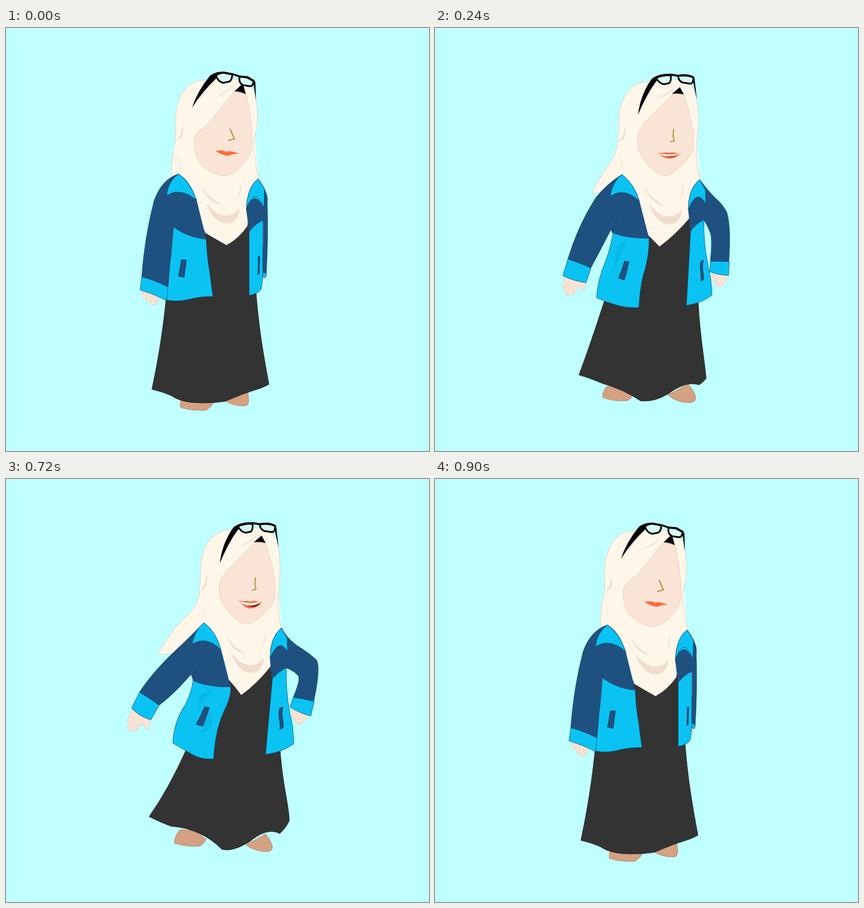
Recreate the animation shown at these times as an HTML page. Size 748x748 px, loop 0.96 s.

```html
<!DOCTYPE html>
<html lang="en">
<head>
<meta charset="utf-8">
<title>Twirl</title>
<style>
html, body { margin: 0; width: 100%; height: 100%; overflow: hidden; background: #c0ffff; }
svg { display: block; width: 100%; height: 100%; }
</style>
</head>
<body>
<svg id="stage" viewBox="0 0 748 748"></svg>
<script>
const CREAM = '#fff6ea', SKIN = '#f9e4d6', SHADE = '#f0ddd0', NAVY = '#1e5180', CYAN = '#0bc3f3',
  DRESS = '#333', SHOE = '#d4a182', LIP = '#ff6b3d', GOLD = '#b8923f';
const SOFT = '#dcc3ae', SEAM = '#123f63', LENS = '#d5fbf8';

const path = (d, fill, stroke = 'none', width = .7) =>
  `<path d="${d}" fill="${fill}" stroke="${stroke}" stroke-width="${width}" stroke-linejoin="round"/>`;

const lerpPath = (a, b, k) => {
  const to = b.match(/[\d.]+/g);
  let i = 0;
  return a.replace(/[\d.]+/g, n => +n + (to[i++] - n) * k);
};

// Each part has a shape for four poses: rest, front, lean, swing.
const behind = [], clothes = [], mouth = [];
const part = (layer, fill, stroke, rest, front, lean, swing) =>
  layer.push({ fill, stroke, shapes: [rest, front, lerpPath(front, lean, .5), lean, swing] });

// shoes
part(behind, SHOE, '#a5734f',
  'M311 656Q306 664 309 671Q325 677 354 676Q363 670 368 661L340 655Z',
  'M300 647Q292 658 296 663Q315 671 335 669Q344 668 344 664L330 652Z',
  'M308 620Q297 632 298 644Q318 651 343 649Q350 645 354 637L335 622Z',
  'M268 596Q249 612 247 627Q265 636 294 632Q300 628 302 623L290 600Z');
part(behind, SHOE, '#a5734f',
  'M386 659Q405 670 425 668Q430 664 429 655Q429 649 426 642Z',
  'M400 650Q412 666 440 666Q455 664 450 652Q445 640 436 632Z',
  'M424 647Q440 659 462 659Q472 658 471 649Q468 638 459 628Z',
  'M402 648Q420 661 440 661Q451 660 450 651Q448 640 440 630Z');
// dress
part(behind, DRESS, '#111',
  'M283 480Q275 560 258 639Q276 643 292 650Q310 663 345 663Q372 663 388 660Q420 646 450 637Q458 634 465 630C454 570 447 530 442 465L430 345L352 355Z',
  'M281 485Q262 570 256 630Q273 630 300 643Q322 660 345 664Q375 664 395 652Q425 632 450 635Q454 636 458 635C452 590 447 540 446 488L433 338L359 370Z',
  'M318 480Q288 547 253 597Q275 608 292 614Q345 618 382 655Q400 660 430 642Q462 615 484 627Q496 616 501 604C500 575 490 545 485 483L470 328L395 352Z',
  'M285 477Q240 515 202 564Q235 582 258 586Q290 620 360 656Q385 659 430 637Q450 624 462 628Q474 618 479 605C480 570 464 530 463 474L448 331L373 352Z');
// scarf end and bust
part(behind, CREAM, SOFT,
  'M299 205Q296 213 294 235Q292 250 292 265L298 262L305 258',
  'M304 207Q301 220 295 240Q290 255 288 275L295 272L311 264',
  'M342 198Q342 217 325 237Q297 260 268 310L311 309L350 254',
  'M321 204Q321 222 308 236Q275 288 199 311Q235 312 258 309L329 256');
part(behind, CREAM, 'none',
  'M299 205L305 258L335 300L352 362Q372 374 390 384Q412 372 427 350L430 300L446 268L440 190Z',
  'M304 207L311 264L342 308L358 376Q368 384 378 391Q408 368 431 342L429 310L449 273L444 205Z',
  'M342 198L350 255L380 299L394 355Q406 368 416 382Q446 360 469 330L467 305L487 264L482 196Z',
  'M321 204L329 256L358 302L373 356Q384 368 395 383Q420 368 447 333L446 300L466 266L462 190Z');

// mouth: lips, opening, teeth, upper lip
part(mouth, LIP, 'none',
  'M370 217Q390 220 411 222Q400 223 392 226Q382 225 370 217Z',
  'M375 226Q396 227 416 226Q407 233 396 233Q385 232 375 226Z',
  'M412 215Q432 221 453 217Q444 229 432 229Q420 228 412 215Z',
  'M391 215Q411 221 432 219Q421 237 409 236Q397 233 391 215Z');
part(mouth, '#7c0608', 'none', 'M0 0',
  'M385 229Q396 230 407 229Q400 230 396 230Q390 230 385 229Z',
  'M425 223Q438 224 451 219Q446 225 438 226Q430 226 425 223Z',
  'M395 221Q412 226 430 221Q420 232 410 232Q401 231 395 221Z');
part(mouth, '#fff5ee', 'none', 'M0 0',
  'M375 226Q396 229 416 226Q407 230 396 230Q385 230 375 226Z',
  'M413 217Q432 221 452 218Q444 223 433 224Q420 224 413 217Z',
  'M392 216Q412 222 432 219Q426 225 412 226Q398 224 392 216Z');
part(mouth, LIP, 'none',
  'M371 217Q384 215 389 219Q395 216 411 222Q395 222 371 217Z',
  'M380 227Q391 223 396 226Q402 223 412 227Q396 229 380 227Z',
  'M418 217Q427 214 432 217Q438 214 446 217Q432 221 418 217Z',
  'M397 217Q407 215 412 219Q418 215 427 219Q412 222 397 217Z');

// hands
part(clothes, SKIN, SOFT,
  'M242 465L241 474Q244 480 249 477Q250 487 255 484Q257 491 262 490Q268 489 269 481Q270 478 270 476L271 475Z',
  'M236 472L234 486Q238 489 241 486Q244 500 250 502Q256 502 258 496Q263 494 264 480Q270 487 277 486L277 475Z',
  'M224 408L214 426Q213 434 220 430Q212 440 217 444Q222 447 227 445Q234 446 240 432Q246 440 250 443L256 426Z',
  'M174 367L164 376Q161 382 165 384Q158 392 164 395Q168 400 175 397Q182 402 186 394Q190 402 196 403L197 398Z');
part(clothes, SKIN, SOFT,
  'M454 440L454 444Q455 445 456 444Q457 445 458 444Q459 444 459 443Q460 442 460 440Z',
  'M473 458L474 473Q479 476 481 472Q484 485 489 483Q494 483 495 475Q501 472 498 456Z',
  'M508 407L505 420Q508 426 511 423Q511 434 517 432Q521 436 525 430Q533 424 534 417Z',
  'M557 383L562 388Q568 390 567 386Q574 389 574 383Q577 380 574 376Q576 370 570 366Z');
// finger lines
part(clothes, 'none', SOFT,
  'M249 477L248 470M256 484L255 474M264 486L263 476',
  'M241 486L243 478M250 499L247 480M258 496L255 480',
  'M220 430L228 420M219 442L230 427M229 443L236 430',
  'M165 384L176 378M164 395L180 386M175 397L186 390');
// sleeves
part(clothes, NAVY, SEAM,
  'M305 258Q275 268 262 305Q245 370 240 440L288 459Q292 390 297 337Z',
  'M311 264Q278 275 266 300Q245 360 234 440L280 449Q290 395 303 342Z',
  'M350 254Q328 277 302 301Q260 340 236 377L271 400Q303 376 340 330Z',
  'M329 256Q290 284 247 313Q212 336 190 350L222 390Q280 360 318 333Z');
part(clothes, NAVY, SEAM,
  'M446 267Q458 284 460 292Q463 298 462 310Q464 370 460 438L454 435Q454 400 455 380Q455 360 455 345Z',
  'M449 273Q468 293 475 305Q481 315 483 332Q491 370 495 434L466 439Q460 400 458 380Q455 360 455 345Z',
  'M487 263Q495 280 514 294Q538 309 549 320Q557 334 544 394L508 386Q521 355 517 348Q510 340 496 334Z',
  'M466 265Q472 278 482 291Q500 308 513 322Q535 350 554 357L529 381Q512 372 500 360Q488 350 475 344Z');
// cuffs
part(clothes, CYAN, SEAM,
  'M240 440Q264 446 288 459L284 482Q260 470 237 463Z',
  'M234 440Q258 443 281 449L278 475Q255 475 230 471Z',
  'M236 377Q254 388 271 400L256 426Q235 420 222 405Z',
  'M190 350Q206 369 222 390L204 405Q187 390 173 365Z');
part(clothes, CYAN, SEAM,
  'M454 432Q457 433 460 434L459 441Q457 442 454 440Z',
  'M466 439Q480 435 496 434L499 456Q483 460 470 459Z',
  'M508 386Q526 389 545 393L539 419Q518 414 502 403Z',
  'M529 381Q540 365 554 357L571 366Q560 382 547 394Z');
// jacket fronts
part(clothes, CYAN, SEAM,
  'M305 258Q325 270 335 300Q345 340 354 374Q356 410 360 430Q363 455 366 475Q347 474 322 480Q302 485 284 481Q287 455 290 415Q295 380 297 337Z',
  'M311 264Q333 282 342 308Q350 345 360 377Q359 410 357 440Q355 465 354 494Q330 494 315 493Q293 492 276 487Q279 460 286 425Q296 390 303 345Z',
  'M350 254Q372 272 380 302Q390 340 397 369Q399 382 388 405Q370 440 367 495Q345 496 331 488Q312 477 295 467Q296 430 318 397Q331 370 332 345Z',
  'M329 256Q350 272 358 302Q368 340 376 373Q354 390 355 418Q352 448 322 489Q302 489 287 480Q267 468 249 456Q258 420 285 400Q308 378 312 338Z');
part(clothes, CYAN, SEAM,
  'M446 267Q427 280 425 320Q429 345 430 362Q430 420 430 473Q446 470 451 462Q455 445 454 420Q454 380 454 340L457 285Z',
  'M449 273Q429 288 429 326Q433 345 433 365Q432 430 430 494Q455 490 471 476Q470 455 464 425Q455 390 455 345L460 291Z',
  'M487 263Q467 280 467 316Q470 340 471 354Q465 420 459 487Q490 483 509 468Q508 435 502 415Q494 370 496 334L498 282Z',
  'M466 265Q446 282 446 318Q449 340 450 354Q460 440 438 481Q475 474 501 452Q498 425 488 410Q473 385 475 344L477 284Z');
// cloth shading
part(clothes, '#08b8e8', 'none', 'M0 0',
  'M303 387Q314 382 312 388Q310 420 289 445ZM320 430Q321 431 320 432Q319 432 319 431Z',
  'M342 384Q366 366 365 374Q345 395 340 412ZM357 405Q372 425 362 440Q352 450 347 445Z',
  'M300 385Q330 372 341 378Q320 405 282 418ZM340 412Q346 425 341 440Q330 447 322 442Z');
// navy yokes
part(clothes, NAVY, 'none',
  'M284 297Q306 280 337 304L354 374Q318 370 295 351L280 320Z',
  'M290 303Q316 285 342 310L360 377Q318 376 295 367L280 330Z',
  'M329 292Q355 276 380 302L397 368Q357 369 331 357L318 320Z',
  'M307 295Q333 279 358 304L376 372Q340 371 309 360L308 330Z');
part(clothes, NAVY, 'none',
  'M426 316Q440 285 456 318L455 340Q440 347 430 361L425 322Z',
  'M429 322Q444 288 460 317L455 345Q444 350 433 365L430 335Z',
  'M467 317Q483 278 498 306L496 334Q482 341 471 354L468 335Z',
  'M446 318Q461 276 477 309L475 341Q460 345 450 357L447 335Z');
part(clothes, 'none', SEAM, 'M297 337L296 352', 'M303 342L296 367', 'M340 330L331 357', 'M318 333L309 360');
// collars
part(clothes, CYAN, SEAM,
  'M305 258Q325 272 337 304Q306 280 284 297Q286 272 305 258Z',
  'M311 264Q333 280 342 309Q316 286 290 303Q294 276 311 264Z',
  'M350 254Q372 270 380 302Q355 276 329 292Q334 268 350 254Z',
  'M329 256Q350 272 358 303Q333 278 307 295Q310 270 329 256Z');
part(clothes, CYAN, SEAM,
  'M446 267Q427 280 425 320Q440 276 456 318L457 285Z',
  'M449 273Q429 288 429 326Q444 284 460 317L459 291Z',
  'M487 263Q467 280 467 317Q483 278 498 306L497 282Z',
  'M466 265Q446 282 446 318Q461 275 477 309L476 284Z');
// pockets
part(clothes, NAVY, '#0b2745',
  'M310 410L319 410Q317 426 315 441L305 439Q308 425 310 410Z',
  'M319 422L326 423Q324 438 322 454L313 451Q317 437 319 422Z',
  'M351 403L360 404Q354 420 348 437L336 434Q344 420 351 403Z',
  'M333 405L341 406Q331 417 319 436L310 432Q319 421 333 405Z');
part(clothes, NAVY, '#0b2745',
  'M446 404L449 404C448 415 448 425 448 434L445 436C446 425 446 414 446 404Z',
  'M456 420L459 418C457 430 459 440 460 450L456 451C456 440 455 430 456 420Z',
  'M484 405L490 403C485 416 492 426 490 440L484 443C487 428 479 420 484 405Z',
  'M466 399L470 395C468 410 479 420 481 436L475 440C476 425 465 415 466 399Z');

const folds =
  path('M354 309Q372 333 392 332Q406 330 413 318Q412 344 390 346Q366 344 354 309Z', SHADE) +
  path('M345 275C355 300 372 305 383 315C365 308 352 300 345 275Z', SHADE) +
  path('M416 274L410 302Q417 290 416 274Z', SHADE) +
  path('M314 168L308 190L301 199Q309 197 312 190Z', SHADE) +
  path('M362 125Q388 116 403 100Q390 119 362 125Z', SHADE) +
  path('M340 128Q347 110 356 104Q350 120 340 128Z', SHADE) +
  path('M304 225Q305 242 311 251', 'none', SHADE, 1);

const drawHead = h =>
  path(h.scarf, CREAM, SOFT) +
  `<g transform="translate(${h.foldShift})">${folds}</g>` +
  path(h.face, SKIN, SOFT) + path(h.cap, '#000') + path(h.temples, '#000') +
  h.lenses.map(d => path(d, LENS, '#000', 3)).join('') +
  path(h.bar, 'none', '#000', 3.4) + path(h.nose, 'none', GOLD, 2);

const turnedHead = drawHead({
  foldShift: '0 0',
  scarf: 'M299 205C302 175 296 150 307 126C315 104 330 93 350 92L385 87Q425 90 438 110C447 140 446 170 440 190C434 215 443 240 446 268',
  face: 'M404 112L363 163C352 178 338 180 334 193C330 215 337 232 348 244Q370 261 386 261Q400 259 410 250C425 236 434 224 435 208C435 170 430 140 424 117Z',
  cap: 'M404 112L419 98L424 117Q414 112 404 112Z',
  temples: 'M329 141Q338 112 361 84L371 81L371 90Q347 112 329 141ZM437 94L441 95L442 128Z',
  lenses: ['M371 84Q378 79 386 79L400 82Q400 93 394 95L384 97Q375 95 371 84Z', 'M413 86L425 87L438 94Q437 103 431 103L419 101Q411 97 413 86Z'],
  bar: 'M363 85Q373 78 385 79L402 82L414 86L427 87L439 94',
  nose: 'M396 178L404 196L393 199'
});
const frontHead = drawHead({
  foldShift: '5 6',
  scarf: 'M304 207C308 175 303 160 312 136C320 114 335 100 358 99L400 95Q430 97 440 115C449 145 447 180 444 205Q440 240 449 273',
  face: 'M402 121L350 174Q338 190 339 205C340 228 352 240 362 251Q376 265 388 266Q400 264 412 252C425 240 437 230 438 212C440 185 430 150 420 121Z',
  cap: 'M400 121L414 109L421 122Q410 119 400 121Z',
  temples: 'M340 158Q344 124 363 96L373 92L373 98Q357 118 340 158ZM436 93L440 94L444 131Z',
  lenses: ['M372 93Q380 88 398 88Q399 99 395 102L386 104Q378 103 372 93Z', 'M411 89Q428 87 438 92Q438 102 433 103L419 101Q411 98 411 89Z'],
  bar: 'M365 96Q376 87 398 87L411 89Q428 86 438 92',
  nose: 'M403 183L402 195L404 204L397 206'
});

const heads = [[turnedHead, '0 0'], [frontHead, '0 0'], [frontHead, '19 -4.5'], [frontHead, '38 -9'], [turnedHead, '22 0']];
const drawLayer = (layer, pose) => layer.map(p => path(p.shapes[pose], p.fill, p.stroke)).join('');

const stage = document.getElementById('stage');
stage.innerHTML = heads.map(([head, shift], pose) =>
  `<g>${drawLayer(behind, pose)}<g transform="translate(${shift})">${head}</g>` +
  drawLayer(mouth, pose) + drawLayer(clothes, pose) + '</g>').join('');

// One pose per 60 ms step.
const STEP = 60, SEQUENCE = '0001234444443210';
const start = performance.now();
function show() {
  const step = Math.floor((performance.now() - start) / STEP) % SEQUENCE.length;
  [...stage.children].forEach((group, pose) => {
    group.style.display = pose === +SEQUENCE[step] ? '' : 'none';
  });
  requestAnimationFrame(show);
}
show();
</script>
</body>
</html>
```
